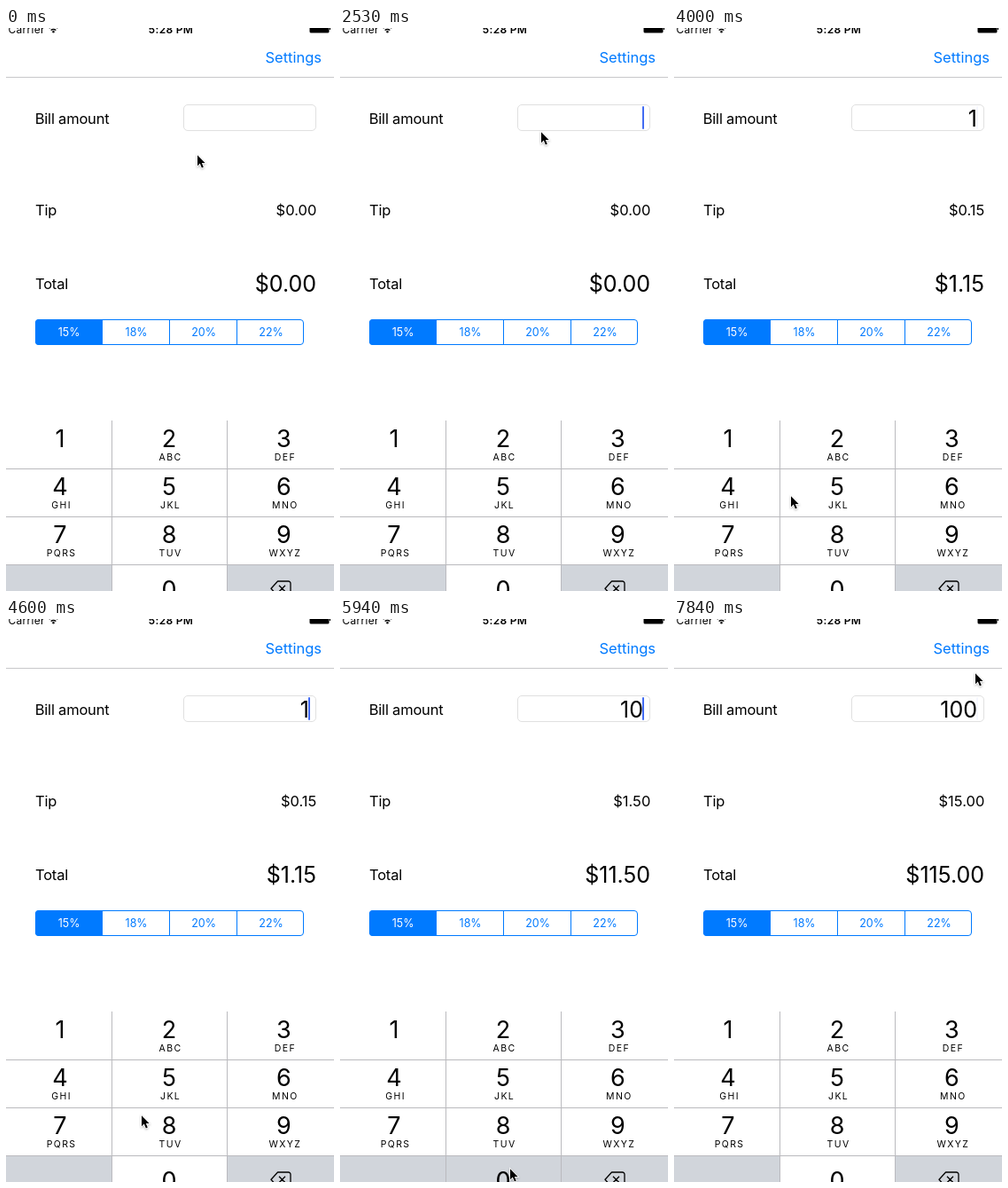
Animation of 370x634 px, one loop 7.99 s. Source, as an HTML page:

```html
<!DOCTYPE html>
<html lang="en">
<head>
<meta charset="utf-8">
<title>Tip calculator</title>
<style>
  html, body { margin: 0; width: 100%; height: 100%; overflow: hidden; background: #fff; }
  svg { display: block; width: 370px; height: 634px; font-family: Inter, "Liberation Sans", sans-serif; }
  .label { font-size: 16.5px; letter-spacing: -.2px; }
  .amount { font-size: 16.5px; }
  .big { font-size: 25px; }
  .end { text-anchor: end; }
  .mid { text-anchor: middle; }
  .seg { font-size: 12.5px; }
  .digit { font-size: 27px; }
  .letters { font-size: 10.5px; letter-spacing: 1.4px; }
  .status { font-size: 12px; letter-spacing: .3px; }
  .rule { stroke: #bababe; fill: none; }
  .blue { fill: #007aff; }
</style>
</head>
<body>
<svg viewBox="0 0 370 634">
  <text class="status" x="2.5" y="5.5">Carrier</text>
  <path d="M48.6 .2Q53.5-3.6 58.4 .2M50.6 2.5Q53.5 .3 56.4 2.5" fill="none" stroke="#000" stroke-width="1.5"/>
  <circle cx="53.5" cy="4.2" r="1.2"/>
  <text class="status mid" x="186" y="5.5" font-weight="600">5:28 PM</text>
  <rect x="342.5" y="-5" width="22" height="10.5" rx="1.5"/>
  <rect x="365" y="-2" width="1" height="4"/>
  <text class="amount blue" x="292.5" y="39">Settings</text>
  <path class="rule" d="M0 55.5H370" style="stroke:#c8c8ca"/>

  <text class="label" x="32.7" y="107.5">Bill amount</text>
  <text class="label" x="33" y="210.5">Tip</text>
  <text class="label" x="33" y="293.5">Total</text>
  <rect x="200.5" y="86.5" width="149" height="29" rx="4.5" fill="#fff" stroke="#e0e0e0"/>
  <text class="big end" id="bill" x="342" y="110.5"></text>
  <rect id="caret" x="341" y="88" width="2" height="26" rx="1" fill="#426bf2"/>
  <text class="amount end" id="tip" x="350.3" y="210.5"></text>
  <text class="big end" id="total" x="350" y="297"></text>

  <g id="segments"></g>
  <path d="M0 605H119V634H0zM250 605H370V634H250z" fill="#d1d5db"/>
  <rect id="held" x="120" y="605" width="129" height="29" fill="#d1d5db"/>
  <path class="rule" d="M0 496.5H370M0 550.5H370M0 604.5H370M119.5 442V634M249.5 442V634"/>
  <g id="keys"></g>
  <path d="M306.5 623H318.5a2.5 2.5 0 0 1 2.5 2.5V637a2.5 2.5 0 0 1-2.5 2.5H306.5L299 631.2ZM308 627.7l7 7m0-7l-7 7"
        fill="none" stroke="#000" stroke-width="1.3" stroke-linejoin="round"/>
  <path id="pointer" d="M1 1.2V13.2L3.8 10.6L5.9 15.4L7.8 14.6L5.8 9.9H9.6Z" stroke="#fff" stroke-width="1.6"
        style="paint-order:stroke;filter:drop-shadow(0 1px 1px #0004)"/>
</svg>
<script>
const LOOP = 7990, FRAMES = 54;

// Places where the pointer stops or turns: time, x, y.
const stops = [
  [0, 215, 142], [890, 303, 106], [2080, 303, 106], [2530, 226, 116], [2970, 90, 452], [3560, 95, 452],
  [4000, 131, 526], [5490, 191, 618], [5940, 191, 618], [6240, 242, 254], [6820, 305, 46],
  [7110, 328, 20], [7550, 325, 103], [7840, 339, 60]
];
// Frames at which the bill gets another character; the first gives the field its focus.
const typed = [[2, ""], [22, "1"], [38, "10"], [41, "100"]];

const $ = id => document.getElementById(id);
const money = n => "$" + n.toFixed(2);
const ease = p => p * p * (3 - 2 * p);
const text = (cls, x, y, s) => `<text class="${cls}" x="${x}" y="${y}">${s}</text>`;

function pointerAt(t) {
  const i = stops.findLastIndex(stop => stop[0] <= t);
  const [t0, x0, y0] = stops[i];
  const [t1, x1, y1] = stops[i + 1] || [LOOP, x0, y0];
  const p = ease((t - t0) / (t1 - t0));
  return [x0 + (x1 - x0) * p, y0 + (y1 - y0) * p].map(Math.round);
}

// The caret blinks every 6.5 frames, counted from the last key press.
function caretAt(age) {
  if (age < 0) return 0;
  const phase = age % 6.5;
  return phase < 3.5 ? 1 : phase < 4 ? .5 : .05;
}

function buildSegments() {
  const labels = ["15%", "18%", "20%", "22%"];
  $("segments").innerHTML =
    `<path class="blue" d="M109 328H37a4 4 0 0 0-4 4V353a4 4 0 0 0 4 4H109Z"/>
     <rect x="33.5" y="328.5" width="302" height="28" rx="3.5" fill="none" stroke="#007aff"/>
     <path d="M108.5 328V357M184.5 328V357M260.5 328V357" stroke="#007aff"/>` +
    labels.map((s, i) => `<g fill="${i ? "#007aff" : "#fff"}">${text("seg mid", 71.1 + 76 * i, 347, s)}</g>`).join("");
}

function buildKeys() {
  const letters = ["", "ABC", "DEF", "GHI", "JKL", "MNO", "PQRS", "TUV", "WXYZ"];
  const columns = [61, 184, 313.3];
  $("keys").innerHTML = letters.map((s, i) => {
    const x = columns[i % 3], y = 472 + 54 * Math.floor(i / 3);
    return text("digit mid", x, y, i + 1) + text("letters mid", x + 1.6, y + 15, s);
  }).join("") + text("digit mid", 184, 641.5, 0);
}

function draw(time) {
  // The small offset absorbs the rounding of frame times to 10 ms.
  const frame = Math.floor(time * FRAMES / LOOP + .06);
  const [x, y] = pointerAt(frame * LOOP / FRAMES);
  const [since, bill] = typed.findLast(key => key[0] <= frame) || typed[0];
  $("pointer").setAttribute("transform", `translate(${x} ${y})`);
  $("caret").setAttribute("opacity", caretAt(frame - since));
  $("held").setAttribute("opacity", bill === "10" ? 1 : 0);
  $("bill").textContent = bill;
  $("tip").textContent = money(bill * .15);
  $("total").textContent = money(bill * 1.15);
}

buildSegments();
buildKeys();
draw(0);
const start = performance.now();
requestAnimationFrame(function tick() {
  draw((performance.now() - start) % LOOP);
  requestAnimationFrame(tick);
});
</script>
</body>
</html>
```
